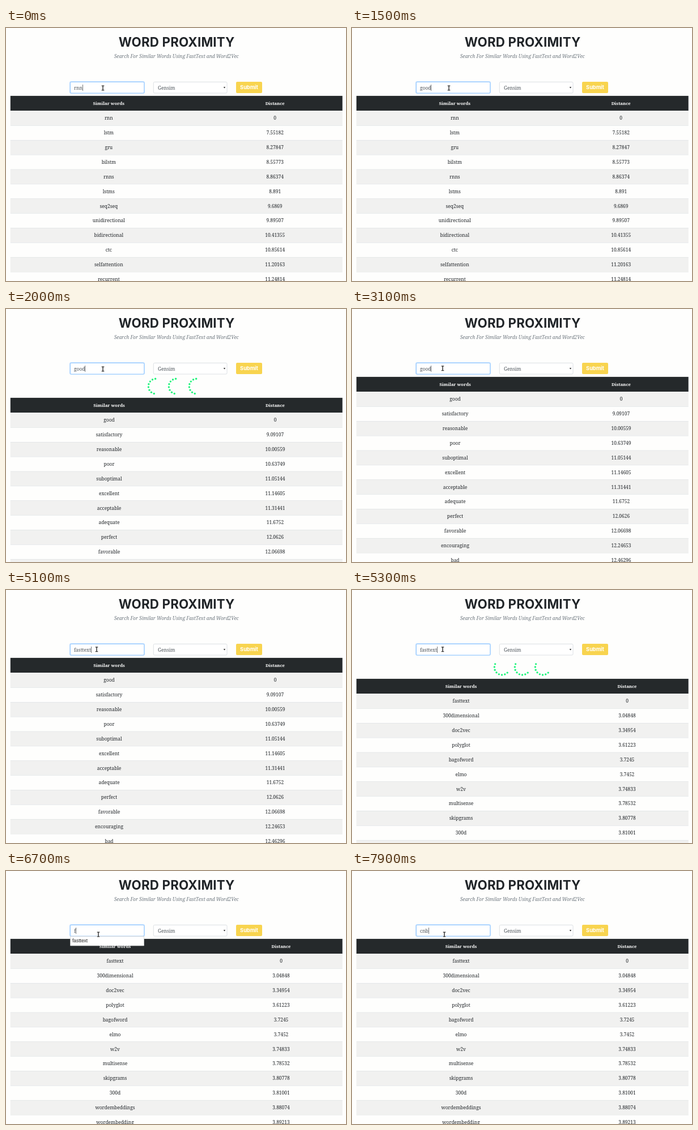
An HTML page with a canvas for the animation above (8 s loop, 600 by 447 pixels).

```html
<!DOCTYPE html>
<html lang="en">
<head>
<meta charset="utf-8">
<title>Word proximity</title>
<style>
html, body { margin: 0; width: 100%; height: 100%; overflow: hidden; background: #fefefd; }
canvas { display: block; width: 600px; height: 447px; }
</style>
</head>
<body>
<canvas id="stage" width="600" height="447"></canvas>
<script>
const ctx = document.getElementById('stage').getContext('2d');
const LOOP = 8000;
const LEFT = 7.8, WIDTH = 585.9;
const ROW = 25.87, HEAD_TOP = 119.9, HEAD_H = 26.3;
const SERIF = '8.44px "Noto Serif", serif';
const SERIF_BOLD = 'bold 7.8px "Noto Serif", serif';
const INK = '#212529', FIELD_INK = '#495057';

const tables = {
  rnn: {
    x: [181.3, 474.7],
    rows: `rnn 0|lstm 7.55182|gru 8.27847|bilstm 8.55773|rnns 8.86374|lstms 8.891|seq2seq 9.6869|
      unidirectional 9.89507|bidirectional 10.41355|ctc 10.85614|selfattention 11.20163|recurrent 11.24814`
  },
  good: {
    x: [182, 475],
    rows: `good 0|satisfactory 9.09107|reasonable 10.00559|poor 10.63749|suboptimal 11.05144|
      excellent 11.14605|acceptable 11.31441|adequate 11.6752|perfect 12.0626|favorable 12.06698|
      encouraging 12.24653|bad 12.46296`
  },
  fasttext: {
    x: [192.5, 485.5],
    rows: `fasttext 0|300dimensional 3.04848|doc2vec 3.34954|polyglot 3.61223|bagofword 3.7245|
      elmo 3.7452|w2v 3.74833|multisense 3.78532|skipgrams 3.80778|300d 3.81001|
      wordembeddings 3.88074|wordembedding 3.89213`
  }
};
for (const t of Object.values(tables)) {
  t.rows = t.rows.split('|').map(r => r.trim().split(' '));
}

// Each track is a list of [start in ms, value]; values hold until the next start.
// The spinner value is its turn in degrees, or null while hidden.
const tracks = {
  text: [[0, 'rnn'], [1100, 'g'], [1400, 'goo'], [1500, 'good'], [3800, 'f'], [4300, 'fas'],
    [4500, 'fast'], [4700, 'fastte'], [5100, 'fasttext'], [6700, 'f'], [7100, 'fast'],
    [7500, 'c'], [7600, 'cn'], [7900, 'cnb']],
  selected: [[0, false], [100, true], [1100, false], [6100, true], [6700, false]],
  caret: [[0, true], [2600, false], [3100, true], [5600, false], [5900, true]],
  table: [[0, 'rnn'], [1900, 'good'], [5300, 'fasttext']],
  spinner: [[0, null], [1900, 0], [2000, 60], [2100, null], [5300, 0], [5400, 60], [5500, null]],
  hint: [[0, ''], [5500, 'fasttext'], [7500, 'cnnlstms'], [7900, '']],
  mouse: [[0, [171, 106]], [2400, [169, 97]], [2500, [165, 85]], [2600, [161, 91]],
    [2700, [160, 100]], [2900, [160, 104.8]], [5800, [162, 108]], [5900, [163, 112]]]
};

function at(track, ms) {
  let value = track[0][1];
  for (const [start, v] of track) if (ms >= start) value = v;
  return value;
}

function rect(x, y, w, h, color) {
  ctx.fillStyle = color;
  ctx.fillRect(x, y, w, h);
}

function box(x, y, w, h, fill, stroke, r = 2) {
  ctx.beginPath();
  ctx.roundRect(x, y, w, h, r);
  ctx.fillStyle = fill;
  ctx.fill();
  if (stroke) {
    ctx.lineWidth = 0.7;
    ctx.strokeStyle = stroke;
    ctx.stroke();
  }
}

function label(str, x, y, font, color, align = 'center', spacing = 0) {
  ctx.font = font;
  ctx.fillStyle = color;
  ctx.textAlign = align;
  ctx.letterSpacing = spacing + 'px';
  ctx.fillText(str, x, y);
}

function drawHeading() {
  label('WORD PROXIMITY', 301.2, 33, 'bold 22.3px Inter, sans-serif', INK, 'center', 0.2);
  label('Search For Similar Words Using FastText and Word2Vec', 300.7, 53,
    'italic ' + SERIF, '#6c757d');
}

function drawTable({ x, rows }, shift) {
  const top = HEAD_TOP + shift;
  const first = top + HEAD_H;
  rect(LEFT, top, WIDTH, HEAD_H, '#25292b');
  ['Similar words', 'Distance'].forEach((s, i) =>
    label(s, x[i], Math.round(top + 16.2), SERIF_BOLD, '#fff'));
  rows.forEach((cells, k) => {
    const y = first + k * ROW;
    if (k % 2 === 0) rect(LEFT, y, WIDTH, ROW, '#f1f1f0');
    if (k) rect(LEFT, y, WIDTH, 0.6, '#dbdfe2');
    cells.forEach((s, i) => label(s, x[i], Math.round(y + 16.2), SERIF, INK));
  });
}

function drawSpinners(turn) {
  ctx.fillStyle = '#20f47c';
  for (let ring = 0; ring < 3; ring++) {
    for (let dot = 0; dot < 8; dot++) {
      const a = (45 + 22.9 * dot + turn) * Math.PI / 180;
      ctx.beginPath();
      ctx.arc(264.7 + 36 * ring + 13.4 * Math.cos(a), 136.6 + 13.4 * Math.sin(a), 1.7, 0, 7);
      ctx.fill();
    }
  }
}

function drawForm(text, selected, caret) {
  box(112, 94, 133, 22, '#bfdeff', null, 3);
  box(113.5, 95.5, 130.2, 19.5, '#fff', '#80bdff');
  ctx.font = SERIF;
  ctx.letterSpacing = '0px';
  const width = ctx.measureText(text).width;
  if (selected) rect(119.5, 99, width + 1, 13, '#3390ff');
  label(text, 120, 109, SERIF, selected ? '#fff' : FIELD_INK, 'left');
  if (caret && !selected) rect(Math.round(120 + width), 100, 0.7, 11, '#343a40');

  box(260.3, 95.4, 129.7, 19.6, '#fff', '#ced4da');
  label('Gensim', 268, 109, SERIF, FIELD_INK, 'left');
  ctx.fillStyle = '#333';
  ctx.beginPath();
  ctx.moveTo(383.8, 104);
  ctx.lineTo(387.2, 104);
  ctx.lineTo(385.5, 106.8);
  ctx.fill();

  box(406, 95, 46, 20, '#f8d44f');
  label('Submit', 429, 108, 'bold 9.2px Inter, sans-serif', '#fff');
}

function drawHint(word) {
  box(113.5, 115.5, 130, 16.5, '#fff', '#c8cacc', 0);
  label(word, 117, 126, '8.44px "Liberation Sans", sans-serif', '#222', 'left');
}

function drawMouse([x, y]) {
  const bars = [[-2.3, -4.5, 4.6, 1.2], [-0.7, -4, 1.4, 8], [-2.3, 3.3, 4.6, 1.2]];
  for (const [dx, dy, w, h] of bars) rect(x + dx - 0.4, y + dy - 0.4, w + 0.8, h + 0.8, '#fff');
  for (const [dx, dy, w, h] of bars) rect(x + dx, y + dy, w, h, '#2c2c2c');
}

function draw(ms) {
  const now = {};
  for (const key in tracks) now[key] = at(tracks[key], ms);
  const loading = now.spinner !== null;
  rect(0, 0, 600, 447, '#fefefd');
  drawHeading();
  drawTable(tables[now.table], loading ? 37 : 0);
  if (loading) drawSpinners(now.spinner);
  drawForm(now.text, now.selected, now.caret);
  if (now.hint) drawHint(now.hint);
  drawMouse(now.mouse);
}

const begin = performance.now();
function tick() {
  draw((performance.now() - begin) % LOOP);
  requestAnimationFrame(tick);
}
tick();
</script>
</body>
</html>
```
